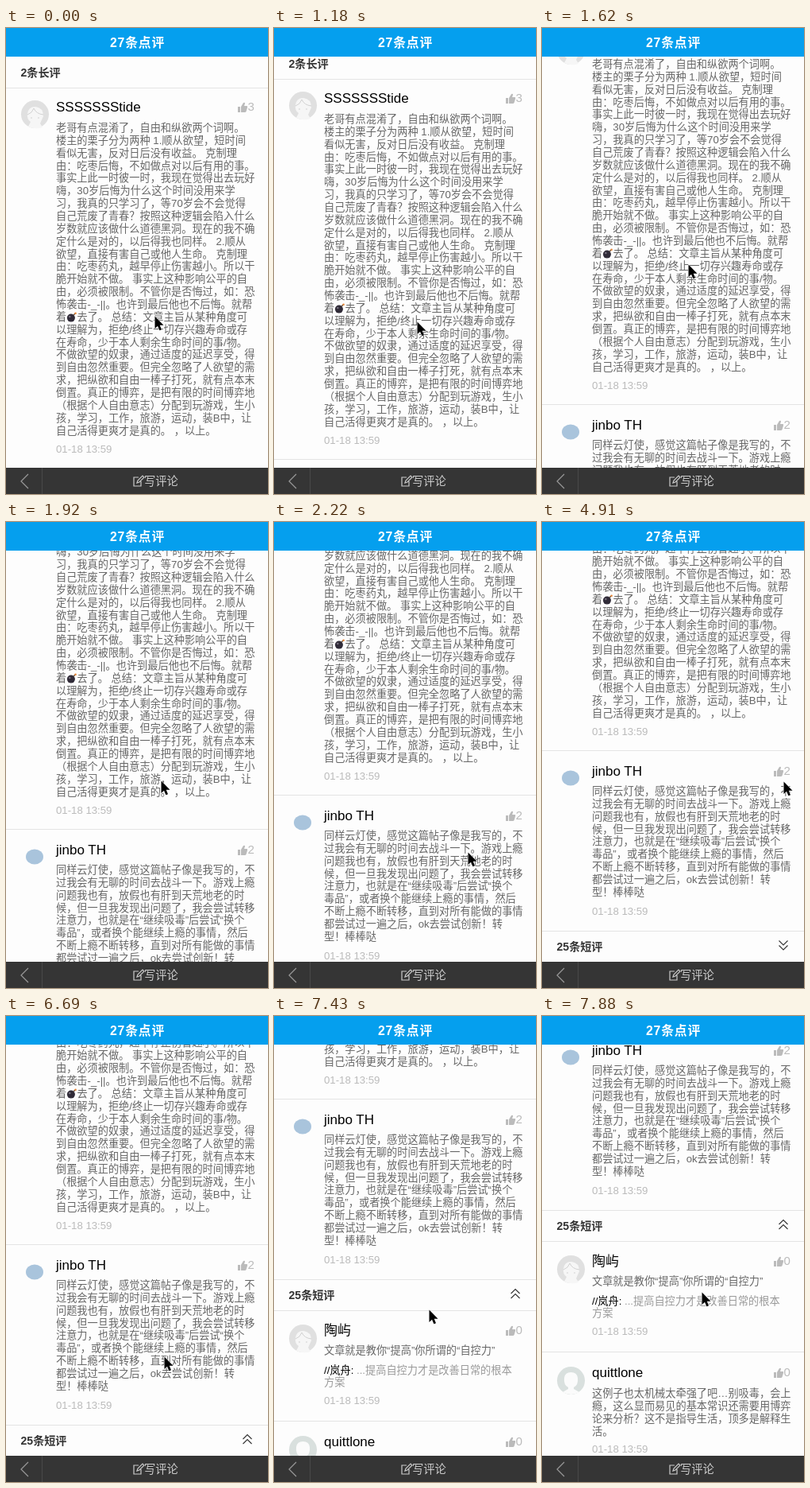
Recreate the animation shown at these times as an HTML page. Size 330 px wide and 586 px high, loop 8000 ms.

```html
<!DOCTYPE html>
<html lang="zh-CN">
<head>
<meta charset="utf-8">
<title>点评</title>
<style>
html, body { margin: 0; width: 100%; height: 100%; overflow: hidden; background: #fdfdfd; }
#stage {
  position: relative; width: 330px; height: 586px; overflow: hidden; background: #fdfdfd;
  font-family: "Liberation Sans", "Noto Sans CJK SC", "Noto Sans CJK", sans-serif;
  font-size: 13.2px; text-spacing-trim: space-all;
}
#stage svg { position: absolute; overflow: visible; }
#page, #stage #cursor { position: absolute; left: 0; top: 0; }
.t { position: absolute; line-height: 20px; white-space: pre; color: #666; }
.name { font-size: 17px; color: #000; }
.date { color: #bbb; }
.head { font-size: 14.1px; font-weight: bold; color: #333; }
.likes { font-size: 15px; color: #bbb; }
.reply { color: #999; }
.reply b { font-weight: normal; color: #000; }
.rule { position: absolute; left: 0; width: 330px; height: 1px; background: #e4e4e4; }
#stage .bomb { position: relative; display: inline-block; width: 13.2px; height: 13px; vertical-align: -2px; }
#top { position: absolute; left: 0; top: 0; width: 330px; height: 36px; background: #059fee; }
#top .t { left: 0; width: 331px; top: 9px; text-align: center; color: #fff; font-size: 15.8px; font-weight: bold; letter-spacing: .8px; }
#bar { position: absolute; left: 0; top: 553px; width: 330px; height: 33px; background: #353535; }
#bar .t { left: 174px; top: 7px; font-size: 14.3px; color: #ccc; }
#bar i { position: absolute; left: 45px; top: 0; width: 1px; height: 33px; background: #484848; }
</style>
</head>
<body>
<div id="stage">
  <div id="page"></div>
  <div id="top"><div class="t">27条点评</div></div>
  <div id="bar">
    <i></i>
    <svg width="330" height="33" fill="none" stroke="#999" stroke-width="1.2">
      <path d="M28 8L19 17L28 26"/>
      <path d="M170 17V23H161V12H167M165 19L166 16L172 10L174 12L168 18Z" stroke="#ccc"/>
    </svg>
    <div class="t">写评论</div>
  </div>
  <svg id="cursor" width="13" height="20">
    <path d="M.5 .5V16L4 12.8L6.4 18.3L9 17.2L6.7 11.8H11.5Z" stroke="#fff" paint-order="stroke"/>
  </svg>
</div>
<script>
const LINE = 15.86;
const page = document.getElementById('page');
const cursor = document.getElementById('cursor');

const bomb = '<svg class="bomb" viewBox="0 0 13 13"><circle cx="5.8" cy="7.6" r="5" fill="#302b38"/>' +
  '<circle cx="4.2" cy="6" r="1.3" fill="#77717f"/><path d="M9 4L11 2" stroke="#6b5543" stroke-width="1.6"/>' +
  '<circle cx="11.5" cy="1.8" r="1.3" fill="#e88a3c"/></svg>';

const add = html => page.insertAdjacentHTML('beforeend', html);
// y is the vertical middle of the line
const text = (x, y, html, kind = '') =>
  add(`<div class="t ${kind}" style="left:${x}px;top:${y - 10}px">${html}</div>`);
const lines = (y, block, kind) =>
  block.trim().split('\n').forEach((s, i) => text(63, y + i * LINE, s, kind));
const rule = y => add(`<div class="rule" style="top:${y}px"></div>`);
const draw = (x, y, body) => add(`<svg style="left:${x}px;top:${y}px" width="36" height="36">${body}</svg>`);

function comment(y, name, likes, dateY) {
  text(63, y, name, 'name');
  draw(291, y - 7, '<path fill="#bbb" d="M1 6H4V13H1ZM5 6L8 1Q10 0 10 2L9 5H12.5Q13.5 5.5 13 7L11.5 12Q11 13 10 13H5Z"/>');
  text(304.5, y - 1, likes, 'likes');
  text(63, dateY, '01-18 13:59', 'date');
}

const girl = '<circle cx="17.5" cy="17.5" r="17.5" fill="#e0e0e0"/>' +
  '<path d="M8 17Q9 8 18 8Q28 9 28 20L24 29L27 34Q18 37 9 33L12 27Q7 24 8 17Z" fill="#f6f6f6"/>' +
  '<path d="M8 18Q14 16 16 10Q19 17 28 18M13 21V23M22 21V23" fill="none" stroke="#d2d2d2"/>';
const plain = '<circle cx="17.5" cy="17.5" r="17.5" fill="#d9e0de"/>' +
  '<path d="M9 14Q10 7 17.5 7Q25 7 26 14Q27 23 21 26V28L28 32Q18 38 7 32L14 28V26Q8 23 9 14Z" fill="#fbfbfb"/>';

text(18.5, 56, '2条长评', 'head');
rule(75);
draw(19, 91, girl);
comment(100, 'SSSSSSStide', 3, 530);
lines(126, `
老哥有点混淆了，自由和纵欲两个词啊。
楼主的栗子分为两种 1.顺从欲望，短时间
看似无害，反对日后没有收益。 克制理
由：吃枣后悔，不如做点对以后有用的事。
事实上此一时彼一时，我现在觉得出去玩好
嗨，30岁后悔为什么这个时间没用来学
习，我真的只学习了，等70岁会不会觉得
自己荒废了青春？按照这种逻辑会陷入什么
岁数就应该做什么道德黑洞。现在的我不确
定什么是对的，以后得我也同样。 2.顺从
欲望，直接有害自己或他人生命。 克制理
由：吃枣药丸，越早停止伤害越小。所以干
脆开始就不做。 事实上这种影响公平的自
由，必须被限制。不管你是否悔过，如：恐
怖袭击-_-||。也许到最后他也不后悔。就帮
着${bomb}去了。 总结：文章主旨从某种角度可
以理解为，拒绝/终止一切存兴趣寿命或存
在寿命，少于本人剩余生命时间的事/物。
不做欲望的奴隶，通过适度的延迟享受，得
到自由忽然重要。但完全忽略了人欲望的需
求，把纵欲和自由一棒子打死，就有点本末
倒置。真正的博弈，是把有限的时间博弈地
（根据个人自由意志）分配到玩游戏，生小
孩，学习，工作，旅游，运动，装B中，让
自己活得更爽才是真的。 ，以上。`);
rule(553);

draw(19, 570, '<ellipse cx="17" cy="18" rx="11" ry="9.5" fill="#a9c4dc"/>');
comment(580, 'jinbo TH', 2, 756);
lines(605, `
同样云灯使，感觉这篇帖子像是我写的，不
过我会有无聊的时间去战斗一下。游戏上瘾
问题我也有，放假也有肝到天荒地老的时
候，但一旦我发现出问题了，我会尝试转移
注意力，也就是在“继续吸毒”后尝试“换个
毒品”，或者换个能继续上瘾的事情，然后
不断上瘾不断转移，直到对所有能做的事情
都尝试过一遍之后，ok去尝试创新！转
型！棒棒哒`);
rule(780);

text(18.5, 799.5, '25条短评', 'head');
draw(298, 791, '<path id="fold" fill="none" stroke="#333" stroke-width="1.1"/>');
rule(819);

draw(19, 837, girl);
comment(845, '陶屿', 0, 933);
lines(870, '文章就是教你“提高”你所谓的“自控力”');
lines(894.5, '<b>//岚舟:</b> ...提高自控力才是改善日常的根本\n方案', 'reply');
rule(958);

draw(19, 977, plain);
comment(985, 'quittlone', 0, 1081);
lines(1011, `
这例子也太机械太牵强了吧…别吸毒，会上
瘾，这么显而易见的基本常识还需要用博弈
论来分析？这不是指导生活，顶多是解释生
活。`);

// Each run: first and last step time, step count, then the scroll and pointer it ends on
const easeIn = p => p ** 1.8;
const easeOut = p => 1 - (1 - p) ** 2;
const runs = [
  [0, 0, 1, 0, 187, 362],
  [140, 140, 1, 0, 180, 366],
  [440, 590, 2, 0, 179, 380],
  [890, 1620, 6, 80, 184, 297, easeIn],
  [1770, 1920, 2, 167, 195, 325],
  [2070, 3110, 8, 266, 307, 531, easeOut],
  [3260, 3260, 1, 266, 303, 530],
  [4160, 4760, 5, 266, 300, 312],
  [4910, 4910, 1, 266, 304, 326],
  [5210, 5360, 2, 266, 282, 400],
  [5510, 5800, 3, 266, 303, 531],
  [6100, 6690, 5, 266, 199, 428, easeIn],
  [6840, 6840, 1, 272, 198, 422],
  [7140, 7430, 3, 449, 195, 369],
  [7580, 7880, 3, 536, 201, 347, easeOut]
];
const LOOP = 8000, UNFOLD = 6250;
const fold = document.getElementById('fold');
const down = 'M.5 1.5L6 7L11.5 1.5M.5 7.5L6 13L11.5 7.5';
const up = 'M.5 7L6 1.5L11.5 7M.5 13L6 7.5L11.5 13';
const start = performance.now();

function pose(t) {
  const k = runs.findLastIndex(run => run[0] <= t);
  const [from, to, count, ...rest] = runs[k];
  const end = rest.slice(0, 3), ease = rest[3] || (p => p);
  if (t >= to) return end;
  const gap = (to - from) / (count - 1);
  const p = ease((Math.floor((t - from) / gap) + 1) / count);
  return runs[k - 1].slice(3, 6).map((v, i) => Math.round(v + (end[i] - v) * p));
}

function show(now) {
  const t = Math.max(0, now - start) % LOOP;
  const [scroll, x, y] = pose(t);
  page.style.transform = `translateY(${-scroll}px)`;
  cursor.style.transform = `translate(${x}px, ${y}px)`;
  fold.setAttribute('d', t < UNFOLD ? down : up);
  requestAnimationFrame(show);
}
show(start);
</script>
</body>
</html>
```
